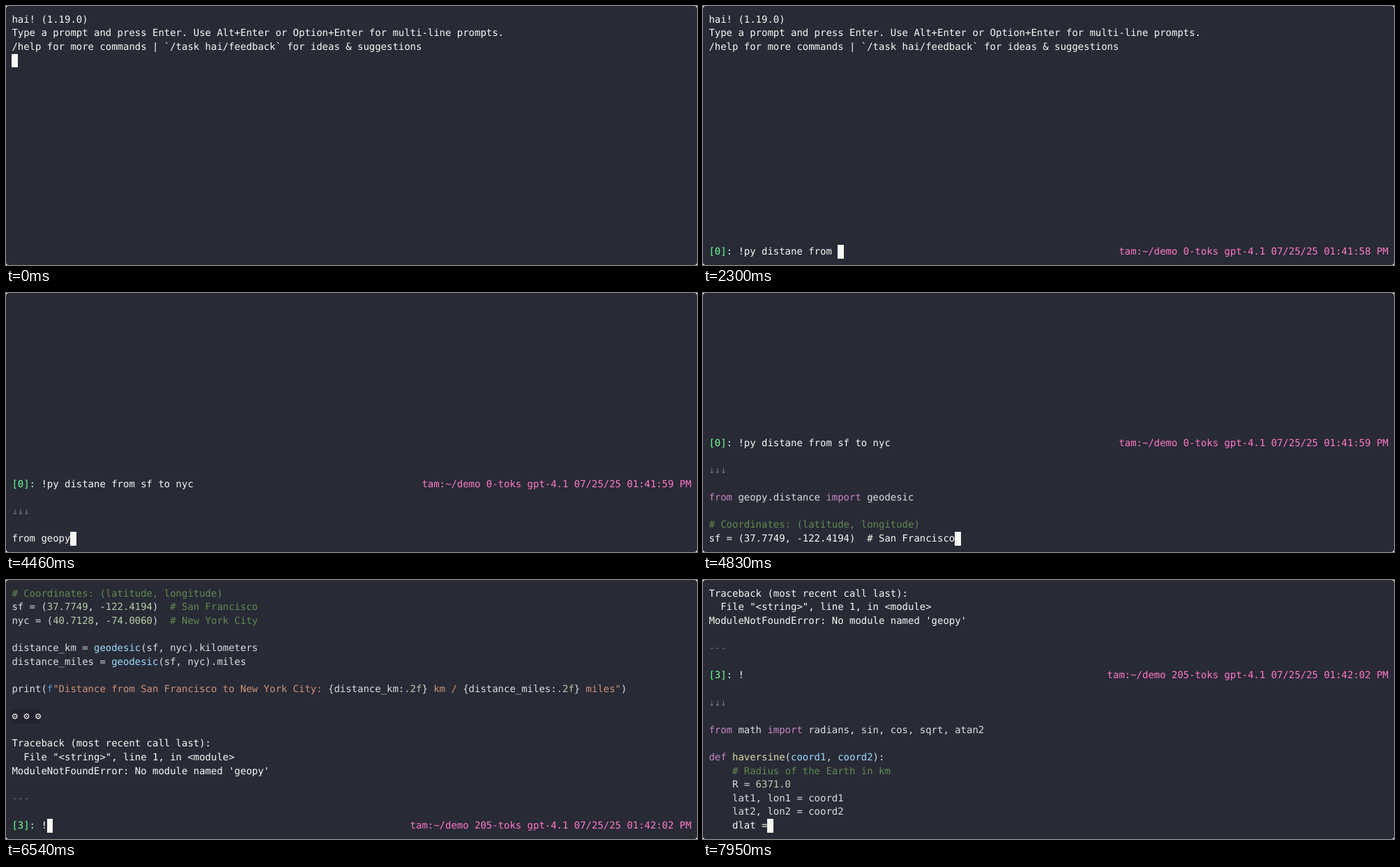
Write an HTML page that moves like this. It is 991 px wide and 372 px high and loops after 8 s.

```html
<!DOCTYPE html>
<html lang="en">
<head>
<meta charset="utf-8">
<title>Terminal session</title>
<style>
  html, body { margin: 0; width: 100%; height: 100%; overflow: hidden; background: #fff; }
  svg { display: block; width: 991px; height: 372px; }
  text {
    font: 14px "DejaVu Sans Mono", monospace;
    font-variant-ligatures: none;
    text-rendering: geometricPrecision;
    white-space: pre;
    transform: rotate(.001deg); /* keeps baselines on fractional pixels */
  }
</style>
</head>
<body>
<svg viewBox="0 0 991 372">
  <rect width="991" height="372" rx="4" fill="#282a36"/>
  <g id="screen"></g>
</svg>
<script>
const LOOP = 8000, ROWS = 18, COLS = 116, CW = 8.4, LH = 19.6;
const colX = col => CW * (1 + col);
const rowY = row => LH * (0.5 + row);

// "§" plus a letter switches the text colour within a line
const COLORS = {
  w: '#f8f8f2', g: '#69ff94', c: '#a4ffff', p: '#ff79c6', d: '#767676', x: '#f8f8f2',
  t: '#dcdcdc', k: '#c586c0', m: '#608b4e', n: '#b5cea8', b: '#9cdcfe',
  s: '#ce9178', f: '#569cd6', y: '#dcdcaa'
};

const header = [
  'hai! (1.19.0)',
  'Type a prompt and press Enter. Use Alt+Enter or Option+Enter for multi-line prompts.',
  '/help for more commands | `/task hai/feedback` for ideas & suggestions'
];

const geoCode = [
  '§kfrom§t geopy.distance §kimport§t geodesic',
  '',
  '§m# Coordinates: (latitude, longitude)',
  '§tsf = (§n37.7749§t, -§n122.4194§t)  §m# San Francisco',
  '§tnyc = (§n40.7128§t, -§n74.0060§t)  §m# New York City',
  '',
  '§tdistance_km = §bgeodesic§t(sf, nyc).kilometers',
  '§tdistance_miles = §bgeodesic§t(sf, nyc).miles',
  '',
  '§tprint(§ff§s"Distance from San Francisco to New York City: §t{distance_km:§n.2f§t}' +
    '§s km / §t{distance_miles:§n.2f§t}§s miles"§t)'
];

const mathCode = [
  '§kfrom§t math §kimport§t radians, sin, cos, sqrt, atan2',
  '',
  '§kdef§t §yhaversine§t(§bcoord1§t, §bcoord2§t):',
  '§t    §m# Radius of the Earth in km',
  '§t    R = §n6371.0',
  '§t    lat1, lon1 = coord1',
  '§t    lat2, lon2 = coord2',
  '§t    dlat ='
];

const gears = ['', '§x⚙ ⚙ ⚙', ''];
const failure = [
  'Traceback (most recent call last):',
  '  File "<string>", line 1, in <module>',
  "ModuleNotFoundError: No module named 'geopy'",
  '', '§d---', ''
];
const arrows = ['', '§d↓↓↓', ''];

const plain = line => line.replace(/§./g, '');

function prompt(id, typed, toks, clock) {
  const status = `tam:~/demo ${toks}-toks gpt-4.1 07/25/25 01:${clock} PM`;
  return `§g[${id}]§c: §w${typed.padEnd(COLS - 5 - status.length)}§p${status}`;
}

// The first n characters of a listing, rounded up to a whole word;
// the unfinished line is not yet highlighted
function stream(code, n) {
  const raw = code.map(plain).join('\n');
  n = Math.round(n);
  while (/^\w\w$/.test(raw.slice(n - 1, n + 1))) n++;
  const lines = raw.slice(0, n).split('\n');
  const last = lines.length - 1;
  return [...code.slice(0, last), lines[last]];
}

const steps = [];
const add = (time, lines, col = plain(lines[lines.length - 1]).length) =>
  steps.push({ time, lines: lines.slice(-ROWS), col });

// First question
const intro = [...header, ...Array(14).fill('')];
const ask = '!py distane from sf to nyc';
function type(time, n) {
  const clock = '41:' + (time < 940 ? 56 : time < 1500 ? 57 : time < 2500 ? 58 : 59);
  add(time, [...intro, prompt(0, ask.slice(0, n), 0, clock)], 5 + n);
}
add(0, [...header, '']);
type(30, 0);
type(940, 1);
for (let i = 0; i < 8; i++) type(1140 + Math.round(i * 7.7) * 10, i < 5 ? i + 2 : i + 3);
for (let i = 0; i < 11; i++) type(i < 7 ? 1850 + i * 75 : 2390 + (i - 7) * 73, 11 + i);
[2680, 2760, 2910, 2990, 3070].forEach((time, i) => type(time, 22 + i));

// First answer
const asked = [...intro, prompt(0, ask, 0, '41:59'), ...arrows];
add(3260, [...asked, '']);
for (let i = 0; i < 14; i++)
  add(i ? 4430 + i * 60 : 4460, [...asked, ...stream(geoCode, 10 + i * 17.5)]);
[[5290, 262], [5350, 284], [5400, 310], [5450, 334]].forEach(
  ([time, n]) => add(time, [...asked, ...stream(geoCode, n)]));
const ran = [...asked, ...geoCode, ...gears];
add(5500, [...ran, '']);
const failed = [...ran, ...failure];
add(5590, [...failed, prompt(3, '', 205, '42:01')], 5);

// Second question and answer
const retry = [...failed, prompt(3, '!', 205, '42:02')];
add(6540, retry, 6);
const retried = [...retry, ...arrows];
add(6900, [...retried, '']);
[7560, 7600, 7650, 7690, 7720, 7770, 7810, 7860, 7900, 7950].forEach((time, i) =>
  add(time, [...retried, ...stream(mathCode, i < 4 ? 22 + i * 21 : 85 + (i - 3) * 100 / 6)]));

const screen = document.getElementById('screen');

function put(tag, attrs, content = '') {
  const el = document.createElementNS('http://www.w3.org/2000/svg', tag);
  for (const key in attrs) el.setAttribute(key, attrs[key]);
  el.textContent = content;
  screen.appendChild(el);
}

// Cell backgrounds snap to whole pixels
function box(col, row, cols, fill) {
  const x = Math.round(colX(col)), y = Math.round(rowY(row));
  const width = Math.round(colX(col + cols)) - x;
  const height = Math.round(rowY(row + 1)) - y;
  put('rect', { x, y, width, height, fill });
}

// Each character sits in its own cell of the grid
function write(str, col, row, fill) {
  const x = [...str].map((_, i) => colX(col + i).toFixed(2)).join(' ');
  put('text', { x, y: rowY(row) + 14, fill }, str);
}

function drawLine(line, row) {
  let col = 0;
  for (const part of ('§w' + line).split('§').slice(1)) {
    const style = part[0], str = part.slice(1);
    if (style === 'x') box(col, row, str.length, '#21222c');
    if (str.trim()) write(str, col, row, COLORS[style]);
    col += str.length;
  }
}

function draw({ lines, col }) {
  screen.textContent = '';
  lines.forEach(drawLine);
  box(col, lines.length - 1, 1, COLORS.w);
}

let shown;
const start = performance.now();
function tick() {
  const t = (performance.now() - start) % LOOP;
  const step = steps.filter(s => s.time <= t).pop();
  if (step !== shown) draw(shown = step);
  requestAnimationFrame(tick);
}
tick();
</script>
</body>
</html>
```
